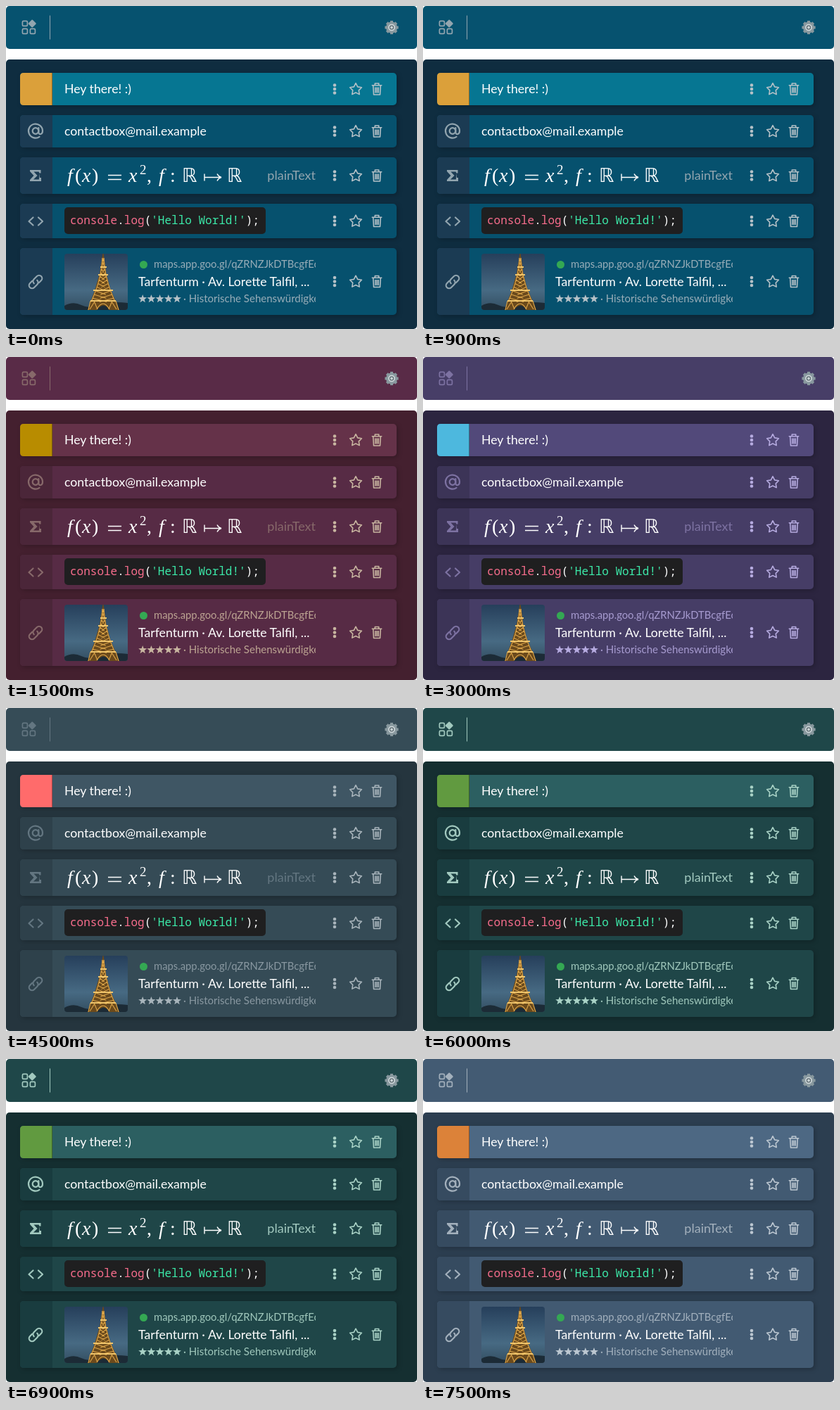
An HTML page for the animation above (8000 ms loop, 584 by 459 pixels).

```html
<!DOCTYPE html>
<html lang="de">
<head>
<meta charset="utf-8">
<title>Theme switcher</title>
<style>
  html, body { margin: 0; width: 100%; height: 100%; overflow: hidden; background: #fff; }
  svg { display: block; }
  #stage { position: absolute; left: 0; top: 0; }
  text { font-family: Lato, "Open Sans", sans-serif; font-size: 17.7px; fill: #fff; white-space: pre; }
  .bar { fill: var(--bar); }
  .panel { fill: var(--panel); }
  .row { fill: var(--row); filter: drop-shadow(2px 2px 3px rgba(0, 0, 0, .22)); }
  .row.selected { fill: var(--selected); }
  .cell { fill: var(--cell); }
  .cell.selected { fill: var(--accent); }
  .icon { fill: none; stroke: var(--icon); stroke-width: 2.2; stroke-linecap: round; stroke-linejoin: round; }
  .solid { fill: var(--icon); stroke: none; }
  .action { fill: none; stroke: var(--action); stroke-width: 1.6; stroke-linecap: round; stroke-linejoin: round; }
  .dot, .rating { fill: var(--action); stroke: none; }
  text.label { fill: var(--icon); font-size: 18px; }
  text.sub { fill: var(--sub); font-size: 14.8px; }
  text.code { font: 16px "Noto Sans Mono", "DejaVu Sans Mono", monospace; }
  .key { fill: #f76d8c; }
  .string { fill: #3ceaa9; }
  .math text { font: 28px "Liberation Serif", "Times New Roman", serif; }
  .math text.var { font-style: italic; }
  .math text.set { font: 27px "DejaVu Sans", sans-serif; }
  .math path { fill: none; stroke: #fff; stroke-width: 1.4; }
</style>
</head>
<body>
<svg id="stage" width="584" height="459" viewBox="0 0 584 459">
  <defs>
    <linearGradient id="sky" x2="0" y2="1">
      <stop stop-color="#263f5b"/><stop offset=".65" stop-color="#476a83"/><stop offset="1" stop-color="#334e61"/>
    </linearGradient>
    <clipPath id="frame"><rect width="90" height="80" rx="4"/></clipPath>
    <g id="actions">
      <g class="dot">
        <circle cx="467" cy="-5.5" r="2.3"/><circle cx="467" r="2.3"/><circle cx="467" cy="5.5" r="2.3"/>
      </g>
      <path id="outline" class="action" transform="translate(497 .5)"/>
      <path class="action" transform="translate(527 0)"
        d="M-6.7-5.3H6.7M-2.7-5.5V-8H2.7V-5.5M-5.3-5L-4.5 8H4.5L5.3-5M-2.2-2V5M0-2V5M2.2-2V5"/>
    </g>
  </defs>

  <rect class="bar" width="584" height="61" rx="5"/>
  <rect class="panel" y="76" width="584" height="383" rx="5"/>

  <g class="icon" style="stroke-width:1.7">
    <rect x="23.4" y="21.4" width="7" height="7" rx="1.5"/>
    <rect x="23.4" y="32.4" width="7" height="7" rx="1.5"/>
    <rect x="34.4" y="32.4" width="7" height="7" rx="1.5"/>
    <rect class="solid" x="-4.2" y="-4.2" width="8.4" height="8.4" rx="1" transform="translate(37.2 25) rotate(45)"/>
    <path d="M62.5 13.5V47.5" style="stroke-width:1;stroke-linecap:butt"/>
  </g>
  <g transform="translate(548 30.5)" fill="none">
    <g id="teeth" stroke="#89999f" stroke-width="4"></g>
    <circle r="6" stroke="#89999f" stroke-width="4"/>
    <circle r="4" fill="#56656b" stroke="#d5dddf" stroke-width="1.6"/>
    <circle r="2" fill="#c7d1d3"/>
  </g>

  <g id="rows"></g>

  <g class="icon" transform="translate(42 177.5)">
    <circle r="4.3"/>
    <path d="M4.3-4.3V1.5C4.3 6 10 5.5 10 0A10 10 0 1 0 5.5 8.4"/>
  </g>
  <path class="solid" transform="translate(42 241)"
    d="M-8-8H7.5V-3.5H5.5L4.5-5.6H-2.5L2.6 0L-3 5.4H4.8L6-3.5 6 3H8V8H-8V6L-2.5 0L-8-6Z"/>
  <path class="icon" d="M38.5 300.5L32.5 306L38.5 311.5M46 300.5L52 306L46 311.5"/>
  <g class="icon" transform="translate(42 392) rotate(-45)">
    <path d="M-2.5-4.3H-7A4.3 4.3 0 0 0-7 4.3H-1A4.3 4.3 0 0 0 3.2 0"/>
    <path d="M2.5 4.3H7A4.3 4.3 0 0 0 7-4.3H1A4.3 4.3 0 0 0-3.2 0"/>
  </g>

  <text x="83" y="123.5">Hey there! :)</text>
  <text x="83" y="183.5">contactbox@mail.example</text>

  <g class="math">
    <text class="var" x="87" y="250">f</text>
    <text x="98" y="250">(</text>
    <text class="var" x="108" y="250">x</text>
    <text x="122" y="250">)</text>
    <path d="M145 240.5H164M145 246.5H164"/>
    <text class="var" x="174" y="250">x</text>
    <text x="190" y="239" style="font-size:19px">2</text>
    <text x="200" y="250">,</text>
    <text class="var" x="217" y="250">f</text>
    <text x="233" y="250">:</text>
    <text class="set" x="250" y="250">ℝ</text>
    <path d="M282 238.5V248.5M282 243.5H305M300 238.5Q302 242.5 306 243.5Q302 244.5 300 248.5"/>
    <text class="set" x="314" y="250">ℝ</text>
  </g>
  <text class="label" x="440" y="246.5" text-anchor="end">plainText</text>

  <rect x="83" y="286" width="286" height="38" rx="5" fill="#1f1f20"/>
  <text class="code" x="91" y="310"><tspan class="key">console</tspan>.<tspan class="key">log</tspan>(<tspan class="string">'Hello World!'</tspan>);</text>

  <g transform="translate(83 352)" clip-path="url(#frame)">
    <rect width="90" height="80" fill="url(#sky)"/>
    <path d="M0 74Q12 67 24 73T50 73T90 70V80H0Z" fill="#1c2b36"/>
    <path d="M54.5 0H55.5L57 9L59.5 28L65 49L78 80H64Q56 67 46 80H33L44 49L50 28L53 9Z" fill="#6b4a1c"/>
    <g id="lattice" fill="none" stroke="#dda64a" stroke-width="1.1"></g>
    <path d="M51 19H60M48 30H62M41 52H69M37 67H73" stroke="#f0c56b" stroke-width="2"/>
  </g>

  <svg x="188" y="352" width="252" height="80">
    <circle cx="7.5" cy="15.5" r="5.5" fill="#34a853"/>
    <text class="sub" x="22" y="20">maps.app.goo.gl/qZRNZJkDTBcgfEc</text>
    <text x="0" y="46">Tarfenturm · Av. Lorette Talfil, ...</text>
    <g id="rating" class="rating"></g>
    <text class="sub" x="64" y="69" style="font-size:15px">· Historische Sehenswürdigkeit</text>
  </svg>
</svg>

<script>
const LOOP = 8000, HOLD = 1500;
const NAMES = ['bar', 'panel', 'row', 'cell', 'selected', 'accent', 'icon', 'action', 'sub'];
const THEMES = [
  '#06526f #0f2d40 #06516e #1b3b53 #067692 #dba03a #92a5af #b5c1c7 #98adb8',
  '#592b47 #44202f #572b45 #4b2639 #653249 #b88c00 #87696a #c8b5a0 #bca492',
  '#473e67 #2c2540 #463d66 #3c3457 #52497a #4db8de #7d72a2 #b6abe0 #a79bd0',
  '#364c57 #25353e #354b56 #2e414b #3f5664 #ff6b6b #637681 #a8b4bb #8998a1',
  '#1f4749 #152f31 #1f4648 #193c3f #2c5f61 #619a40 #a2c9bf #a9d2c6 #a0c8bc',
  '#435b73 #2c3e50 #425a72 #364b60 #4d6883 #dc8239 #a3b0bc #bcc7d1 #a2b0bd'
];
const ROWS = [[95, 46], [155, 46], [215, 52], [281, 49], [344, 95]];

const byId = id => document.getElementById(id);
const repeat = (n, draw) => Array.from({ length: n }, (_, i) => draw(i)).join('');

function starPath(outer, inner) {
  const points = Array.from({ length: 10 }, (_, i) => {
    const r = i % 2 ? inner : outer, a = i * Math.PI / 5 - Math.PI / 2;
    return `${(r * Math.cos(a)).toFixed(2)} ${(r * Math.sin(a)).toFixed(2)}`;
  });
  return `M${points.join('L')}Z`;
}

byId('outline').setAttribute('d', starPath(8.8, 4.5));
byId('teeth').innerHTML = repeat(8, i => `<path d="M0-6V-9.6" transform="rotate(${i * 45})"/>`);
byId('rating').innerHTML = repeat(5, i =>
  `<path d="${starPath(6.3, 2.6)}" transform="translate(${6.2 + i * 12.2} 64.2)"/>`);

byId('rows').innerHTML = ROWS.map(([y, h], i) => {
  const state = i ? '' : ' selected';
  return `<rect class="row${state}" x="20" y="${y}" width="535" height="${h}" rx="5"/>
    <path class="cell${state}" d="M66 ${y}H25q-5 0-5 5v${h - 10}q0 5 5 5H66Z"/>
    ${i ? '' : `<path d="M65.5 ${y}v${h}" stroke="#000" stroke-opacity=".35"/>`}
    <use href="#actions" y="${y + h / 2}"/>`;
}).join('');

// Crossed braces that widen toward the foot of the tower
const halfWidth = y => 1 + y * y / 290;
byId('lattice').innerHTML = repeat(12, i => {
  const y = 6 + i * 5.2, next = y + 5.2;
  const a = halfWidth(y), b = halfWidth(next);
  return `<path d="M${55 - a} ${y}L${55 + b * .3} ${next}M${55 + a} ${y}L${55 - b * .3} ${next}
    M${55 - a} ${y}L${55 - b} ${next}M${55 + a} ${y}L${55 + b} ${next}"/>`;
}) + '<path d="M37 67L34 80M42 67L47 79M36 79L43 68M73 67L77 80M68 67L63 79M74 79L67 68M46 79Q55 63 64 79"/>';

const toFrame = (theme, offset) => {
  const colors = theme.split(' ');
  const frame = { offset, easing: 'steps(1, end)' };
  NAMES.forEach((name, i) => { frame['--' + name] = colors[i]; });
  return frame;
};
const frames = THEMES.map((theme, i) => toFrame(theme, i * HOLD / LOOP));
frames.push(toFrame(THEMES.at(-1), 1));
byId('stage').animate(frames, { duration: LOOP, iterations: Infinity });
</script>
</body>
</html>
```
